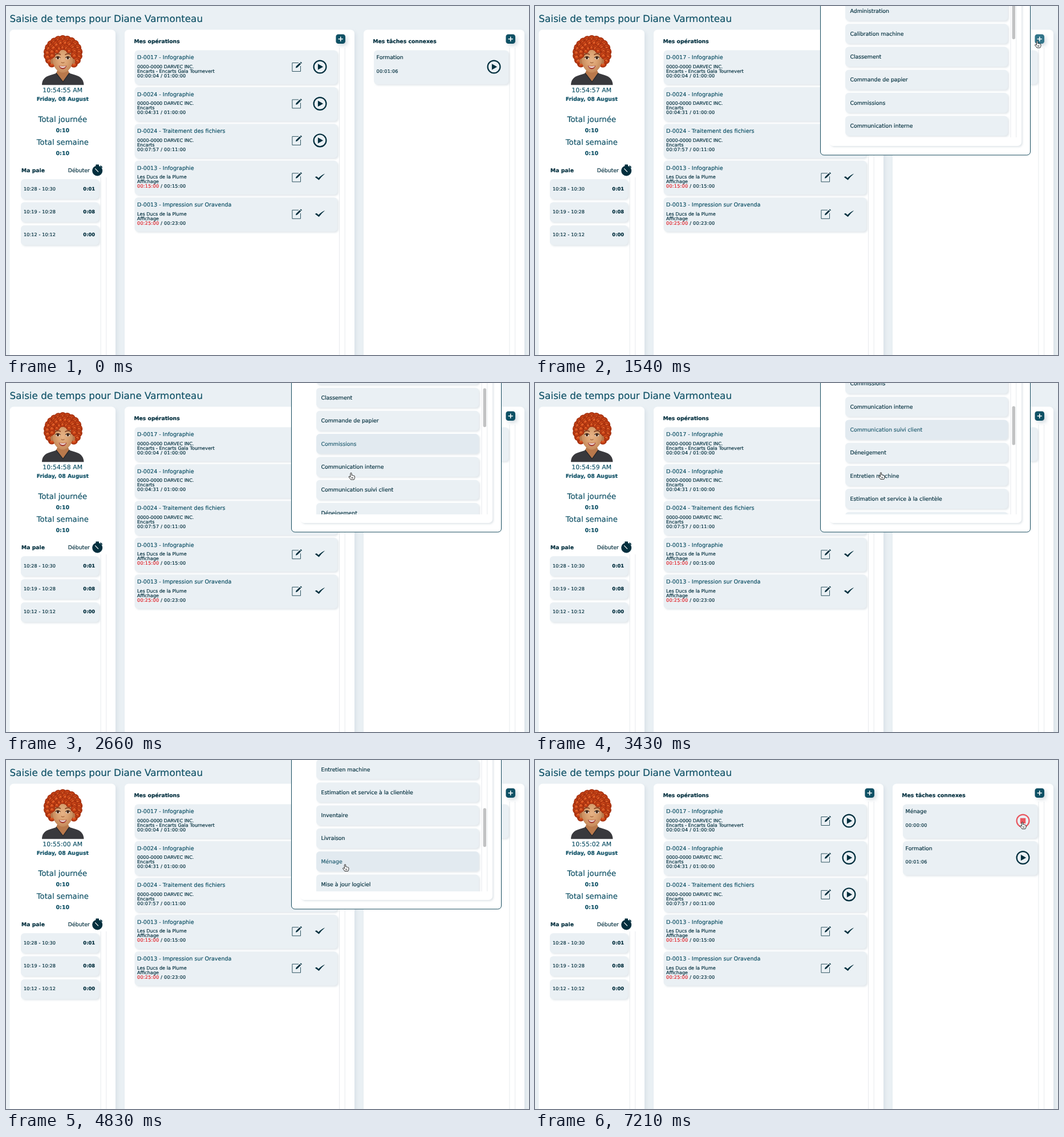
Recreate the animation shown at these times as an HTML page. Size 917 by 611 pixels, loop 8000 ms.

```html
<!DOCTYPE html>
<html lang="fr">
<head>
<meta charset="utf-8">
<title>Saisie de temps</title>
<style>
html, body { margin: 0; width: 100%; height: 100%; overflow: hidden; background: #eaf0f4; }
svg { display: block; width: 917px; height: 611px; }
text {
  font-family: "DejaVu Sans", Verdana, sans-serif; text-rendering: geometricPrecision; white-space: pre;
  fill: currentColor; stroke: currentColor; stroke-width: .18px;
}
</style>
</head>
<body>
<svg id="stage" viewBox="0 0 917 611" xmlns="http://www.w3.org/2000/svg"></svg>
<script>
const TEAL = '#0f5166', DARK = '#022f3e', CARD = '#eaf0f4', RED = '#e01b22';
const ROW = 64.45, ITEM = 40.3, LOOP = 8000, STEP = 70;

const text = (x, y, size, str, o = {}) =>
  `<text x="${x}" y="${y}" font-size="${size}" color="${o.color || DARK}"` +
  ` font-weight="${o.bold ? 700 : 400}" letter-spacing="${o.ls || 0}"` +
  ` text-anchor="${o.anchor || 'start'}"${o.id ? ` id="${o.id}"` : ''}>${str}</text>`;
const box = (x, y, w, h, r, fill, extra = '') =>
  `<rect x="${x}" y="${y}" width="${w}" height="${h}" rx="${r}" fill="${fill}" ${extra}/>`;
const fillPath = (d, fill, extra = '') => `<path d="${d}" fill="${fill}" ${extra}/>`;
const line = (d, color, width, extra = '') =>
  `<path d="${d}" fill="none" stroke="${color}" stroke-width="${width}" stroke-linecap="round" ${extra}/>`;
const oval = (x, y, rx, ry, fill) => `<ellipse cx="${x}" cy="${y}" rx="${rx}" ry="${ry}" fill="${fill}"/>`;
const group = (x, y, body) => `<g transform="translate(${x} ${y})">${body}</g>`;
const card = (x, y, w, h) => box(x, y, w, h, 6, CARD, 'filter="url(#soft)"');
const rails = (x, y, bottom = 611) => [0, 9.7].map(d => box(x + d, y, 1, bottom - y, 0, '#e7eaed')).join('');

const ring = color => `<circle r="10.9" fill="none" stroke="${color}" stroke-width="2.2"/>`;
const play = (x, y) => group(x, y, ring(DARK) + fillPath('M-3.6 -5.2L5.6 0L-3.6 5.2Z', DARK));
const check = (x, y) => group(x, y, fillPath('M-8.8 -.4L-5.8 -1.6L-2.6 1.4Q3 -4.4 8.8 -6.4Q2.6 -1.4 -1.9 5Z', DARK));
const edit = (x, y) => group(x, y,
  line('M3 -7.3H-7.6V7.7H7V-1.4', DARK, .8) +
  fillPath('M-1.6 1.6L-.8 -1.2L5.6 -7.4L7.6 -5.4L1.2 .9Z', DARK) +
  fillPath('M6.3 -8L7.5 -9.1L9.5 -7.1L8.4 -6Z', DARK));
const plus = (x, id) => group(x, 57.8,
  box(-8.3, -8.3, 16.6, 16.6, 4.2, '#0d5165', `id="${id}" filter="url(#lift)"`) +
  line('M-3.5 0H3.5M0 -3.5V3.5', '#fff', 1.6));

function avatar() {
  const shade = '#b9794c', shirt = '#39393d';
  const locks = (k, spread, n) => Array.from({ length: n }, (_, i) => {
    const a = Math.PI * (1.5 + spread * (2 * i / (n - 1) - 1));
    const wobble = Math.sin(i * 12.9 + k * 78) * 1.1, r = 4.4 + 2.4 * k;
    const x = 99.5 + (27.4 * k + wobble) * Math.cos(a), y = 82 + (25 * k + wobble) * Math.sin(a);
    return group(x.toFixed(1), y.toFixed(1), `<circle r="${r}" fill="url(#hair)"/>` +
      line(`M${-r * .7} ${r * .4}Q${wobble * 2} ${-r} ${r * .7} ${r * .2}`, '#8d2509', 1));
  }).join('');
  const eye = x => oval(x, 91, 3.4, 2.6, '#fff') + oval(x, 91, 2.3, 2.4, '#4a2915') +
    line(`M${x - 4} 90.4Q${x} 86.6 ${x + 4} 90.4`, '#2b1710', 1.1) +
    line(`M${x - 4.4} 85.2Q${x} 82 ${x + 4.4} 84.8`, '#7c3518', 1.5);
  return oval(99.5, 81, 29, 27, '#84210a') + locks(1, .76, 17) +
    fillPath('M63 138.3Q63 125 78 121L91 117H109L122 121Q136 125 136.5 138.3Z', shirt) +
    fillPath('M88 117.5L100 133L111 117.5L107 108H92Z', shade) +
    line('M88 117.5L100 133L111 117.5', '#28282b', 1.3) +
    oval(81, 97, 3, 4.6, shade) + oval(118, 97, 3, 4.6, shade) +
    fillPath('M81.5 88Q81 70 99.5 70Q118 70 117.5 88Q118 104 110 112Q99.5 121.5 89 112Q81 104 81.5 88Z', 'url(#skin)') +
    locks(.72, .56, 10) + locks(.46, .36, 5) + eye(91) + eye(108.5) +
    line('M97.2 98.8Q99.6 100.6 102 98.8', '#a5663d', 1.3) +
    fillPath('M92.5 104.6Q99.5 106 106.5 104.6Q104.5 110.8 99.5 110.8Q94.5 110.8 92.5 104.6Z', '#a8453b') +
    fillPath('M94 105.3Q99.5 106.6 105 105.3Q103.5 108 99.5 108Q95.5 108 94 105.3Z', '#fff');
}

const ops = [
  ['D-0017 - Infographie', '0000-0000 DARVEC INC.', 'Encarts - Encarts Gala Tournevert', '00:00:04', '01:00:00'],
  ['D-0024 - Infographie', '0000-0000 DARVEC INC.', 'Encarts', '00:04:31', '01:00:00'],
  ['D-0024 - Traitement des fichiers', '0000-0000 DARVEC INC.', 'Encarts', '00:07:57', '00:11:00'],
  ['D-0013 - Infographie', 'Les Ducs de la Plume', 'Affichage', '00:15:00', '00:15:00', true],
  ['D-0013 - Impression sur Oravenda', 'Les Ducs de la Plume', 'Affichage', '00:25:00', '00:23:00', true]
];
const pay = [['10:28 - 10:30', '0:01'], ['10:19 - 10:28', '0:08'], ['10:12 - 10:12', '0:00']];
const items = ['Administration', 'Calibration machine', 'Classement', 'Commande de papier', 'Commissions',
  'Communication interne', 'Communication suivi client', 'Déneigement', 'Entretien machine',
  'Estimation et service à la clientèle', 'Inventaire', 'Livraison', 'Ménage', 'Mise à jour logiciel', 'Réunion'];

const opRow = ([title, client, job, spent, total, done], i) => group(0, i * ROW,
  card(225.5, 77.5, 355.5, 59.5) +
  text(230, 93.3, 9.6, title, { color: TEAL }) +
  text(230, 108.9, 8.15, client) +
  text(230, 116.9, 8.1, job) +
  text(230, 124.9, 8.1, `<tspan color="${done ? RED : DARK}">${spent}</tspan> / ${total}`, { ls: .26 }) +
  edit(509.5, 106.8) + (done ? check : play)(550.5, 106.5));

const taskRow = (name, time, icon) =>
  card(645, 77.5, 236, 59.5) + text(649.6, 93.3, 9.35, name) + text(649.6, 116.9, 8.1, time, { ls: .22 }) + icon;

const payRow = ([span, sum], i) => group(0, i * ITEM,
  card(26, 303.3, 137, 34.5) + text(31, 322.5, 8.1, span, { ls: .1 }) +
  text(156, 322.5, 8.3, sum, { bold: true, anchor: 'end' }));

const mid = { anchor: 'middle', color: TEAL }, midBold = { ...mid, bold: true };
const leftPanel = avatar() +
  text(99.3, 151, 10.8, '', { ...mid, ls: .12, id: 'clock' }) +
  text(99.3, 165.7, 9.28, 'Friday, 08 August', midBold) +
  text(99.3, 202.8, 13.3, 'Total journée', mid) + text(99.3, 220.7, 9.5, '0:10', midBold) +
  text(99.3, 243.1, 13.2, 'Total semaine', mid) + text(99.3, 261.2, 9.5, '0:10', midBold) +
  text(27, 290.8, 9.25, 'Ma paie', { bold: true }) + text(108.8, 290.8, 9.33, 'Débuter') +
  group(160.2, 288.4, `<circle r="9" fill="${DARK}"/>` + box(-2.8, -10.8, 5.6, 2.6, .6, DARK) +
    line('M5.8 -8.2L8 -6', DARK, 1.8) + line('M-3.6 -3.6L1.4 1.8', '#fff', 1.2)) +
  rails(165.6, 300) + pay.map(payRow).join('');

const popover = box(500.5, -30, 368, 291, 6, '#fff', 'stroke="#164b5d"') +
  box(516, -30, 337, 275, 7, '#fff', 'filter="url(#soft)"') + rails(833.5, 0, 230) +
  '<g clip-path="url(#list)"><g id="scroller">' + items.map((name, i) => group(0, 8.1 + i * ITEM,
    `<g class="item">${card(544, -17.2, 285, 34.6)}${text(552.5, 3.4, 9.35, name)}</g>`)).join('') + '</g></g>' +
  box(836.6, -9.7, 5.4, 68, 2.7, '#c1c2c3', 'id="thumb"');

const cursor = '<g id="cursor" stroke-linejoin="round">' +
  fillPath('M0 0V9.8L2.3 7.7L3.9 11.2L5.5 10.5L4 7.1H7Z', '#000', 'id="arrow" stroke="#fff" stroke-width=".7"') +
  fillPath('M-1.1 1Q-1 -.3 0 -.3Q1.1 -.3 1.1 1V4Q2.8 3.4 3 4.5Q4.6 4 4.8 5Q6.4 4.8 6.4 6.2V8.2Q6.2 10 5.2 11.6H-.6' +
    'Q-1.4 10 -3.6 7.6Q-4.4 6.2 -3.2 5.9Q-2.2 5.8 -1.1 7.2ZM1.2 7.4V9.6M3 7.4V9.6',
    '#fff', 'id="hand" stroke="#111" stroke-width=".9"') + '</g>';

const shadow = (id, d, blur, color, opacity) =>
  `<filter id="${id}" x="-50%" y="-50%" width="200%" height="200%">` +
  `<feDropShadow dx="${d}" dy="${d}" stdDeviation="${blur}" flood-color="${color}" flood-opacity="${opacity}"/></filter>`;
const radial = (id, ...colors) => `<radialGradient id="${id}">` +
  colors.map((c, i) => `<stop offset="${i / (colors.length - 1)}" stop-color="${c}"/>`).join('') + '</radialGradient>';

const $ = id => document.getElementById(id);
$('stage').innerHTML = '<defs>' +
  shadow('soft', 2, 1.7, '#c9d3da', .55) + shadow('lift', 3.5, 3, '#b9c6cf', .6) + shadow('panel', 3.5, 3, '#d3dde4', .7) +
  radial('hair', '#ea6f35', '#cf4718', '#9c2b0c') + radial('skin', '#e6b386', '#dba373', '#c68a5b') +
  '<clipPath id="list"><rect x="538" y="0" width="294.5" height="230"/></clipPath></defs>' +
  box(0, 0, 917, 611, 0, CARD) +
  [[6.5, 185.5], [208, 403], [627, 282]].map(([x, w]) => box(x, 41.5, w, 600, 7, '#fff', 'filter="url(#panel)"')).join('') +
  text(6.6, 28.1, 16.75, 'Saisie de temps pour Diane Varmonteau', { color: TEAL }) +
  leftPanel +
  text(224.4, 65.3, 9.25, 'Mes opérations', { bold: true }) + rails(584, 73) + ops.map(opRow).join('') + plus(586.7, 'addOp') +
  text(643.2, 65.3, 9.3, 'Mes tâches connexes', { bold: true }) + rails(882.4, 73) +
  `<g id="running">${taskRow('Ménage', '00:00:00', group(855.5, 106.5, ring('currentColor') + box(-4.7, -4.7, 9.4, 9.4, .5, 'currentColor')))}</g>` +
  `<g id="idle">${taskRow('Formation', '00:01:06', play(855.5, 106.5))}</g>` + plus(884.7, 'addTask') +
  `<g id="pop">${popover}</g>` + cursor;

const OPEN = 1330, CLOSE = 4900, START = 4970;

// Pointer legs: start, end, destination
const legs = [
  [70, 910, 877, 65], [910, 1190, 880.5, 61.5], [1890, 2660, 605, 157.5], [3360, 3430, 606.5, 157],
  [4200, 4830, 594.5, 183], [5110, 5250, 607, 174], [5530, 5950, 737, 162], [6160, 6370, 682, 141], [6370, 7210, 854.5, 109]
];
// Scroll flicks: start, duration, distance
const flicks = [[2590, 210, 89.5], [3360, 140, 90], [3710, 280, 134.9]];

const progress = (t, from, to) => Math.min(1, Math.max(0, (t - from) / (to - from)));
const smooth = p => p * p * (3 - 2 * p);
const easeOut = p => 1 - (1 - p) ** 3;

const pointer = t => legs.reduce(([x, y], [from, to, tx, ty]) => {
  const p = smooth(progress(t, from, to));
  return [x + (tx - x) * p, y + (ty - y) * p];
}, [706, 611]);
const scrolled = t => flicks.reduce((sum, [from, time, dist]) => sum + dist * easeOut(progress(t, from, from + time)), 0);
const near = (x, y, cx, cy, r) => Math.max(Math.abs(x - cx), Math.abs(y - cy)) < r;

function itemUnder(t) {
  const [x, y] = pointer(t);
  const inList = t > OPEN && t < START && x > 544 && x < 830 && y < 230;
  return inList ? Math.round((y - 8.1 + scrolled(t)) / ITEM) : -1;
}

const show = (el, on) => el.setAttribute('visibility', on ? 'visible' : 'hidden');
const shift = (el, x, y) => el.setAttribute('transform', `translate(${x} ${y})`);
const itemNodes = [...document.querySelectorAll('.item')];

function draw(t) {
  // The clock skips a beat while the new task starts.
  const stalled = t >= 5390 && t < 6090;
  const sec = 55 + Math.floor((t + 910) / 1050) - stalled;
  $('clock').textContent = `10:${54 + Math.floor(sec / 60)}:${String(sec % 60).padStart(2, '0')} AM`;

  const started = t >= START, [x, y] = pointer(t);
  const onAdd = near(x, y, 884.7, 57.8, 9);
  const onStop = started && near(x, y, 855.5, 106.5, 10);
  const hand = onAdd || onStop || itemUnder(t) >= 0;
  shift($('cursor'), x, y);
  show($('arrow'), t >= 70 && !hand);
  show($('hand'), hand);
  $('addTask').setAttribute('fill', onAdd ? '#30758a' : '#0d5165');

  $('pop').setAttribute('opacity', progress(t, OPEN, OPEN + 210) - progress(t, CLOSE, CLOSE + 140));
  const s = scrolled(t), active = itemUnder(t - STEP);
  shift($('scroller'), 0, -s);
  shift($('thumb'), 0, s * .299);
  itemNodes.forEach((node, i) => {
    node.firstChild.setAttribute('fill', i === active ? '#e2eaf0' : CARD);
    node.lastChild.setAttribute('color', i === active ? '#1f5b6f' : DARK);
  });

  show($('running'), started);
  shift($('idle'), 0, started ? ROW : 0);
  $('running').setAttribute('color', onStop ? '#e9565f' : '#c9222f');
}

const start = performance.now();
function frame() {
  const t = (performance.now() - start) % LOOP;
  draw(Math.floor(t / STEP) * STEP);
  requestAnimationFrame(frame);
}
frame();
</script>
</body>
</html>
```
